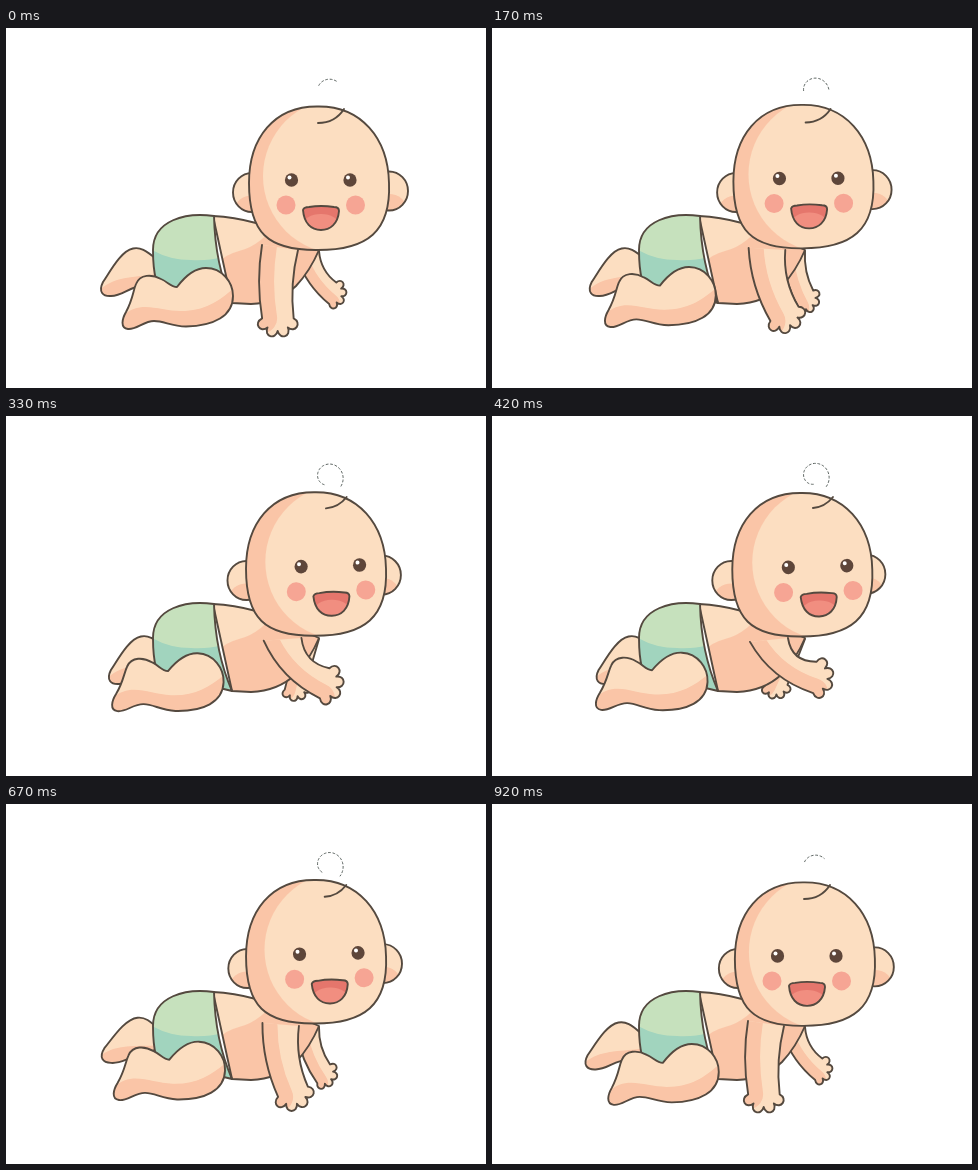
An HTML page with a canvas for the animation above (0.96 s loop, 480x360 px).

```html
<!DOCTYPE html>
<html>
<head>
<meta charset="utf-8">
<title>Crawling baby</title>
<style>
html, body { margin: 0; width: 100%; height: 100%; overflow: hidden; background: #fff; }
canvas { display: block; }
</style>
</head>
<body>
<canvas id="stage" width="480" height="360"></canvas>
<script>
const ctx = document.getElementById('stage').getContext('2d');
const { sin, cos, min, max, PI } = Math;
const LOOP = 960, STEPS = 23;
const LINE = '#54493f', LIGHT = '#fcdec1', SHADE = '#fac5a7';

function fill(path, color) {
  ctx.fillStyle = color;
  ctx.fill(path);
}

function stroke(path, color = LINE, width = 1.9) {
  ctx.strokeStyle = color;
  ctx.lineWidth = width;
  ctx.stroke(path);
}

function oval(x, y, rx, ry = rx) {
  const path = new Path2D();
  path.ellipse(x, y, rx, ry, 0, 0, 2 * PI);
  return path;
}

// Outlined shape whose inner colouring is clipped to it.
function shape(path, color, paintInside) {
  fill(path, color);
  ctx.save();
  ctx.clip(path);
  paintInside();
  ctx.restore();
  stroke(path);
}

// Runs paint in a frame moved by (x, y) and turned about the pivot.
function moved(x, y, turn, pivotX, pivotY, paint) {
  ctx.save();
  ctx.translate(x + pivotX, y + pivotY);
  ctx.rotate(turn);
  ctx.translate(-pivotX, -pivotY);
  paint();
  ctx.restore();
}

const polar = ([x, y], radius, degrees) => {
  const angle = degrees * PI / 180;
  return [x + radius * cos(angle), y + radius * sin(angle)];
};

// Two bent edges from the shoulder end in a fan of four fingers.
function drawArm({ left, right, angle, length, hand, bend, size }) {
  const wrist = polar([(left[0] + right[0]) / 2, (left[1] + right[1]) / 2], length, angle);
  const spot = (radius, turn) => polar(wrist, radius * size, hand + turn);
  const elbow = (a, b) => polar([(a[0] + b[0]) / 2, (a[1] + b[1]) / 2], 2 * bend, angle + 90);
  const [outer, inner] = [spot(16, 76), spot(16, -76)];

  const edge = new Path2D();
  edge.moveTo(...left);
  edge.quadraticCurveTo(...elbow(left, outer), ...outer);
  const path = new Path2D(edge);
  for (let turn = 57; turn >= -57; turn -= 38)
    path.bezierCurveTo(...spot(26, turn + 14), ...spot(26, turn - 14), ...spot(16.5, turn - 19));
  path.quadraticCurveTo(...elbow(right, inner), ...right);
  shape(path, LIGHT, () => stroke(edge, SHADE, 30 * size));
}

function drawFarLeg(p, lift) {
  const leg = new Path2D('M150 231 C140 222 134 219 127 220.5 C115 223 105 242 97 254 C92 264 97 268.5 105 268 C115 268 120 262 130 259 L150 250');
  moved(10 * p - 4 * lift, -5 * lift, .1 * lift, 150, 235, () => shape(leg, LIGHT, () =>
    fill(new Path2D('M90 266 C105 248 125 250 150 246 L150 280 L90 280 Z'), SHADE)));
}

function drawNearLeg(p) {
  const leg = new Path2D('M171 259 C180 247 190 240 200 240 C216 240 227 254 227 268 C227 288 208 298 180 298.5 C165 298 158 293 148 293 C138 293 130 302 122 301 C114 300 116 291 120 284 C127 271 127 263 130 256 C134 246 146 246 155 251 C162 254 165 259 171 259 Z');
  moved(-12 * p, -4 * p, .05 * p, 190, 270, () => shape(leg, LIGHT, () =>
    fill(new Path2D('M110 296 C130 268 150 283 175 283 C200 283 215 272 230 258 L230 310 L110 310 Z'), SHADE)));
}

function drawTorso() {
  const torso = new Path2D('M207 188 Q228 189 250 195 L313 222 Q304 243 290 258 Q272 275 245 276 L226 275 Z');
  shape(torso, SHADE, () =>
    fill(new Path2D('M200 180 L275 190 Q255 218 233 223 Q218 227 211 236 Z'), LIGHT));
  const diaper = new Path2D('M208 188 C180 184 147 192 147 222 Q147 240 150 252 L172 262 L226 275 Q209 236 208 188 Z');
  shape(diaper, '#c6e1bd', () =>
    fill(new Path2D('M140 218 Q160 232 185 232 Q202 233 216 229 L235 285 L140 285 Z'), '#a1d4be'));
}

function drawHead(p, turn) {
  const rise = -2.5 * sin(PI * p / 1.2);
  for (const [x, y] of [[246 - 7 * p, 164.5], [383 - 9 * p, 163 - 5 * p]])
    shape(oval(x, y, 19, 19.5), LIGHT, () => fill(oval(x, y + 17, 17, 14), SHADE));

  const head = new Path2D('M312 78.5 C355 78 382 110 383 155 C385 203 362 222.5 310 222 C262 222 243 205 243 155 C243 110 268 78 312 78.5 Z');
  moved(-3 * sin(PI * p / 1.5), rise, 0, 0, 0, () =>
    shape(head, SHADE, () => fill(oval(335 + 6 * turn, 148, 78), LIGHT)));

  moved(12 * turn, rise, -.03 * turn, 315, 190, drawFace);
  stroke(new Path2D(`M${312 + 9 * turn} ${95 - 3 * turn} Q${329 + 4 * turn} ${95 - 4 * turn} ${338 + 3 * turn} 81`));
}

function drawFace() {
  for (const x of [285.5, 344]) {
    fill(oval(x, 152, 6.6, 6.8), '#5e463a');
    fill(oval(x - 2, 149.5, 2), '#fff');
  }
  for (const x of [280, 349.5]) fill(oval(x, 177, 9.5), '#f6a594');
  const mouth = new Path2D('M297 182 Q298 179 303 179 Q315 177 328 179 Q333 179 333 183 C332 196 324 202 315 202 C305 202 298 195 297 182 Z');
  shape(mouth, '#e5766c', () => fill(oval(315, 197, 18, 11), '#f18e80'));
}

// Dotted spiral curl above the hair.
function drawCurl(p) {
  const curl = new Path2D();
  const end = PI * (1.75 + .5 * min(1, 2 * p));
  for (let a = PI * (1.2 - .7 * p); a < end; a += .1) {
    const radius = 8 + 1.5 * (a - PI / 2);
    curl.lineTo(322 + radius * cos(a), 64 - 4 * p + radius * sin(a));
  }
  ctx.setLineDash([2, 2.5]);
  stroke(curl, '#4c5552', .9);
  ctx.setLineDash([]);
}

function draw(now) {
  const step = Math.floor((now % LOOP) / LOOP * STEPS + .2) % STEPS;
  const phase = 2 * PI * step / STEPS;
  const p = (1 - cos(phase)) / 2;
  const lift = max(0, -sin(phase));
  // The arms come back faster than they reach out.
  const reach = (1 - cos(phase + .2 * sin(phase / 2) + .8 * lift)) / 2;

  ctx.clearRect(0, 0, 480, 360);
  ctx.lineCap = ctx.lineJoin = 'round';
  drawFarLeg(p, lift);
  drawArm({
    left: [291, 230], right: [313, 223], size: .72, length: 44, bend: 4 - 4 * reach,
    angle: 60 + 55 * reach, hand: 18 + 70 * reach
  });
  drawTorso();
  drawNearLeg(p);
  drawArm({
    left: [256 + 2 * reach, 217 + 9 * reach], right: [292 + 4 * reach, 222], size: 1,
    length: 67 - 11 * reach, bend: 3 + 5 * reach, angle: 92 - 51 * reach, hand: 90 - 85 * reach
  });
  drawHead(p, p * p * (3 - 2 * p));
  drawCurl(p);
}

const start = performance.now();
function tick() {
  draw(performance.now() - start);
  requestAnimationFrame(tick);
}
tick();
</script>
</body>
</html>
```
